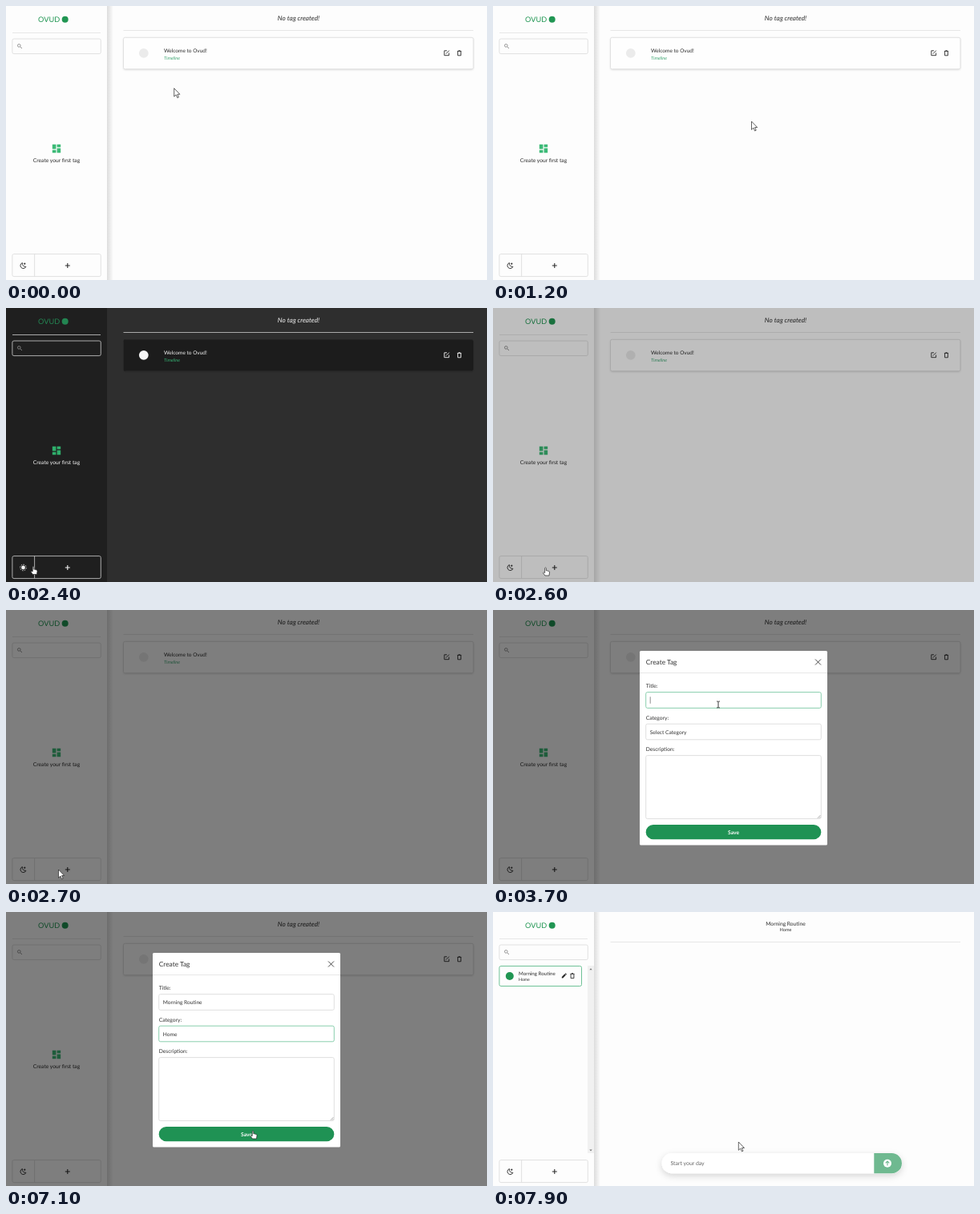
Write an HTML page that moves like this. It is 600x342 px and loops after 8000 ms.

```html
<!DOCTYPE html>
<html lang="en">
<head>
<meta charset="utf-8">
<title>Task list</title>
<style>
html, body { margin: 0; width: 100%; height: 100%; overflow: hidden; background: #fdfdfd; }
svg { display: block; width: 600px; height: 342px; font: 6.7px Lato, sans-serif; text-rendering: geometricPrecision;
  --side: #fdfdfd; --main: #fdfdfd; --card: #fefefe; --ink: #2b2b2b; --line: #e7e7e7; --edge: #dedede;
  --dot: #ebebeb; --brand: #219653; --accent: #3dba77; --sub: #3fa673; }
svg.dark { --side: #1f1f1f; --main: #2e2e2e; --card: #1f1f1f; --ink: #f5f5f5; --line: #a9a9a9; --edge: #bcbcbc;
  --dot: #f4f4f4; --brand: #238552; --accent: #2fae6b; --sub: #35b273; }
text { fill: var(--ink); }
.mid { text-anchor: middle; }
.ink { fill: var(--ink); }
.line { stroke: var(--line); }
.box { fill: none; stroke: var(--edge); stroke-width: .9; }
.pen { fill: none; stroke: var(--ink); stroke-width: .9; }
.field { fill: #fff; stroke: #dcdcdc; stroke-width: .9; }
.focus { stroke: #7cc9a4; }
.light { --ink: #333; --line: #e8e8e8; }
.pointer { fill: #fff; stroke: #222; stroke-width: .7; stroke-linejoin: round; }
.off { display: none; }
.dark .day, svg:not(.dark) .night { display: none; }
</style>
</head>
<body>
<svg id="stage" viewBox="0 0 600 342">
  <defs>
    <linearGradient id="fade"><stop stop-color="#000" stop-opacity=".13"/><stop offset="1" stop-color="#000" stop-opacity="0"/></linearGradient>
    <filter id="soft" x="-10%" y="-40%" width="120%" height="200%"><feDropShadow dx="0" dy="1" stdDeviation="1" flood-opacity=".14"/></filter>
    <filter id="float" x="-10%" y="-60%" width="120%" height="240%"><feDropShadow dx="0" dy="3" stdDeviation="4" flood-opacity=".16"/></filter>
    <path id="bin" class="pen" d="M-2.6-2.4H2.6M-1-3.1H1M-1.9-2.2V3H1.9V-2.2"/>
  </defs>

  <rect width="600" height="342" fill="var(--main)"/>
  <rect width="126" height="342" fill="var(--side)"/>
  <rect class="day" x="126" width="8" height="342" fill="url(#fade)"/>

  <!-- sidebar -->
  <text x="40" y="20" font-size="9.2" style="fill:var(--brand)">OVUD</text>
  <circle cx="73.7" cy="16.8" r="4" fill="var(--brand)"/>
  <path class="line" d="M8 33.5H118"/>
  <rect class="box" x="7.9" y="41" width="110.4" height="18.6" rx="2"/>
  <g fill="none" stroke="#888" stroke-width=".9"><circle cx="16.3" cy="49.4" r="1.8"/><path d="M17.7 50.8L20 53"/></g>

  <g id="noTags">
    <path fill="var(--accent)" transform="translate(56.1 171.1) scale(.575)" d="M3 13h8V3H3zM3 21h8v-6H3zM13 21h8V11h-8zM13 3v6h8V3z"/>
    <text class="mid" x="63" y="195.3">Create your first tag</text>
  </g>
  <g id="tags" class="off">
    <rect class="box" x="7.9" y="67.5" width="102.6" height="25" rx="2" style="stroke:#5fbb8c"/>
    <circle cx="20.8" cy="80" r="5" fill="var(--brand)"/>
    <text x="32" y="78.8" font-size="6.2">Morning Routine</text>
    <text x="32" y="85.6" font-size="5.2">Home</text>
    <path class="ink" d="M85.8 82.4v-1.5l3.6-3.6 1.5 1.5-3.6 3.6zM89.8 76.9l.7-.7 1.5 1.5-.7.7z"/>
    <use href="#bin" x="99" y="79.7"/>
    <rect x="118" y="67" width="8" height="234" fill="#f1f1f1"/>
    <path fill="#777" d="M120.3 72.3L122 70.3l1.7 2zM120.3 296.5h3.4L122 298.5z"/>
  </g>

  <rect id="hover" class="off" x="8" y="309.7" width="27.7" height="27.8" rx="2" fill="#e5e5e5"/>
  <rect class="box" x="7.9" y="309.6" width="110.4" height="28" rx="2"/>
  <path class="box" d="M35.6 309.6v28"/>
  <g class="day">
    <path class="pen" d="M20.4 320.6A3.6 3.6 0 1 0 24.9 325.4A4 4 0 0 1 20.4 320.6z"/>
    <path class="ink" d="M23.2 320l.5 1.3 1.3.5-1.3.5-.5 1.3-.5-1.3-1.3-.5 1.3-.5z"/>
  </g>
  <g class="night">
    <circle class="ink" cx="21.5" cy="324" r="2.4"/>
    <circle class="pen" cx="21.5" cy="324" r="3.8" pathLength="16" stroke-dasharray="1"/>
  </g>
  <path class="pen" d="M73.8 324h6M76.8 321v6" style="stroke-width:1.1"/>

  <!-- welcome page -->
  <g id="welcome">
    <text class="mid" x="365" y="17.8" font-size="8.2" font-style="italic">No tag created!</text>
    <path class="line" d="M146.500 30.5H583"/>
    <rect x="146.500" y="39.300" width="436.500" height="39.400" rx="2" fill="var(--card)" filter="url(#soft)"/>
    <rect class="box day" x="146.500" y="39.300" width="436.500" height="39.400" rx="2"/>
    <circle cx="171.800" cy="58.800" r="5.900" fill="var(--dot)"/>
    <text x="197" y="58" font-size="6.5">Welcome to Ovud!</text>
    <text x="197" y="66.700" font-size="5.700" font-style="italic" style="fill:var(--sub)">Timeline</text>
    <path class="pen" d="M550 55.800H546.800V61.700H552.600V58.600M548.900 59.600L552.800 55.600"/>
    <use href="#bin" x="565.500" y="58.800"/>
  </g>

  <!-- tag page -->
  <g id="page" class="off">
    <text class="mid" x="365" y="17.200">Morning Routine</text>
    <text class="mid" x="365" y="24.300" font-size="5.600">Home</text>
    <path class="line" d="M146.500 37.500H583"/>
    <rect x="210.500" y="301" width="299.500" height="25.300" rx="12.650" fill="#fff" filter="url(#float)"/>
    <path fill="#6fb990" d="M475.300 301H497.350a12.650 12.650 0 0 1 0 25.300H475.300z"/>
    <circle cx="492" cy="313.700" r="5" fill="#fff"/>
    <path fill="none" stroke="#6fb990" stroke-width="1.100" d="M492 316.500v-5M489.700 313.300L492 311l2.300 2.300"/>
    <text x="221.500" y="316.200" font-size="6.900" style="fill:#666">Start your day</text>
  </g>

  <rect id="shade" width="600" height="342" opacity="0"/>

  <g id="modal" class="light off">
    <rect x="183" y="51" width="234" height="242.500" rx="1.500" fill="#fff"/>
    <text x="190.700" y="67.800" font-size="8.400">Create Tag</text>
    <path class="pen" d="M402 61.500l7 7M409 61.500l-7 7"/>
    <path class="line" d="M183 78.500H417"/>
    <text x="190.700" y="97.200">Title:</text>
    <rect id="titleBox" class="field" x="190.700" y="102.600" width="218.600" height="19.800" rx="2"/>
    <text id="titleText" x="195.800" y="115" font-size="6.600"></text>
    <path id="caret" d="M0 108.300v8.500" stroke="#444" stroke-width=".6"/>
    <text x="190.700" y="136.600">Category:</text>
    <rect id="pickBox" class="field" x="190.700" y="142.200" width="218.600" height="19.600" rx="2"/>
    <text id="pickText" x="195.800" y="154.600" font-size="6.600"></text>
    <text x="190.700" y="176.200">Description:</text>
    <rect class="field" x="190.700" y="181.600" width="218.600" height="79" rx="2"/>
    <path d="M404.800 259.800l3.700-3.700M406.800 259.800l1.700-1.700" stroke="#777" stroke-width=".6"/>
    <rect x="190.700" y="268" width="218.600" height="18.300" rx="9.150" fill="#1f9254"/>
    <text class="mid" x="300" y="279.600" font-weight="700" style="fill:#fff">Save</text>
    <g id="list">
      <rect x="190.700" y="162" width="218.600" height="43.600" fill="#fff" stroke="#888" stroke-width=".6"/>
      <rect id="mark" x="191" width="218" height="10.800" fill="#1e73d8"/>
    </g>
  </g>

  <g id="cursor">
    <path id="arrow" class="pointer" d="M0 0V10.300L2.400 8.100 4.100 11.900 5.700 11.200 4.100 7.500H7.200z"/>
    <path id="hand" class="pointer" d="M-.8 6.500V.6Q0-.6.8.6V3.800Q1.800 3.200 2.400 4.200 3.500 3.700 4 4.800 5 4.500 5.100 5.600L4.500 10H-.6L-3 6.700Q-2.500 5.400-.8 6.500z"/>
    <path id="beam" fill="none" stroke="#222" stroke-width=".9" d="M-1.900-4Q-.3-4 0-3.300.3-4 1.900-4M0-3.300V3.300M-1.900 4Q-.3 4 0 3.300.3 4 1.900 4"/>
  </g>
</svg>
<script>
const $ = id => document.getElementById(id);
const LOOP = 8000, STEP = 100;
const title = 'Morning Routine';
const keys = [3800, 3900, 4000, 4100, 4200, 4300, 5000, 5200, 5500, 5600, 5700, 5700, 5800, 5800, 5900];
const options = ['Select Category', 'Home', 'Work', 'Other'];

// time, x, y and pointer shape from that time on
const path = [
  [0, 209.7, 102.7, 'arrow'], [100, 209.7, 102.7, 'arrow'], [400, 236, 108, 'arrow'], [500, 236, 108, 'arrow'],
  [1000, 430, 120, 'arrow'], [1400, 215, 168, 'arrow'], [1900, 34, 322, 'hand'], [2100, 35, 322.5, 'hand'],
  [2400, 34, 322.5, 'hand'], [2600, 65.5, 324, 'hand'], [2700, 65.5, 324, 'arrow'], [2800, 65.5, 324, 'arrow'],
  [3200, 240, 175, 'arrow'], [3500, 281, 118, 'beam'], [6000, 281, 118, 'beam'], [6200, 279, 148, 'arrow'],
  [6400, 278, 151, 'arrow'], [6700, 262, 177, 'arrow'], [6900, 262, 178, 'arrow'], [7100, 308, 273, 'hand'],
  [7300, 309, 273, 'arrow'], [7500, 310, 262, 'arrow'], [7600, 310, 262, 'arrow'], [7900, 306.3, 287, 'arrow'],
  [LOOP, 306.3, 287, 'arrow']
];

const optionY = i => 162.2 + i * 10.8;
options.forEach((name, i) => {
  const item = document.createElementNS('http://www.w3.org/2000/svg', 'text');
  item.setAttribute('x', 195.8);
  item.setAttribute('y', optionY(i) + 7.7);
  item.textContent = name;
  $('list').append(item);
});

const ramp = (t, from, to) => Math.min(1, Math.max(0, (t - from) / (to - from)));
const ease = k => 1 - (1 - k) ** 2;
const within = (t, from, to) => t >= from && t < to;
const show = (id, on) => $(id).classList.toggle('off', !on);
const set = (id, name, value) => $(id).setAttribute(name, value);

function drawCursor(t) {
  const i = path.findIndex((p, n) => t >= p[0] && t < path[n + 1][0]);
  const [t0, x0, y0, shape] = path[i], [t1, x1, y1] = path[i + 1];
  const k = ramp(t, t0, t1);
  set('cursor', 'transform', `translate(${x0 + (x1 - x0) * k} ${y0 + (y1 - y0) * k})`);
  for (const id of ['arrow', 'hand', 'beam']) show(id, id === shape);
}

function drawForm(t) {
  const typed = keys.filter(k => k <= t);
  $('titleText').textContent = title.slice(0, typed.length);
  const sinceKey = t - (typed.at(-1) ?? 3600);
  show('caret', within(t, 3600, 6000) && sinceKey % 1000 < 500);
  const gap = title[typed.length - 1] === ' ' ? 1.3 : 0;
  const width = typed.length ? $('titleText').getComputedTextLength() + gap : 0;
  set('caret', 'transform', `translate(${196.2 + width} 0)`);

  $('titleBox').classList.toggle('focus', within(t, 3600, 6400));
  $('pickBox').classList.toggle('focus', t >= 6400);
  $('pickText').textContent = options[t < 6800 ? 0 : 1];
  const active = t < 6600 ? 0 : 1;
  show('list', within(t, 6400, 6800));
  set('mark', 'y', optionY(active));
  $('list').querySelectorAll('text').forEach((item, i) => item.style.fill = i === active ? '#fff' : '#222');
}

function draw(t) {
  const saved = t >= 7200;
  $('stage').classList.toggle('dark', within(t, 2200, 2500));
  show('hover', within(t, 1900, 2200));
  for (const id of ['noTags', 'welcome']) show(id, !saved);
  for (const id of ['tags', 'page']) show(id, saved);
  set('shade', 'opacity', .5 * (ramp(t, 2500, 2700) - ramp(t, 7300, 7500)));

  const open = ease(ramp(t, 2700, 3000)) - ramp(t, 7100, 7400);
  show('modal', open > 0);
  set('modal', 'opacity', open);
  set('modal', 'transform', `translate(0 ${-21 * (1 - open)})`);
  if (open > 0) drawForm(t);
  drawCursor(t);
}

function tick() {
  draw(Math.floor(performance.now() % LOOP / STEP) * STEP);
  requestAnimationFrame(tick);
}
tick();
</script>
</body>
</html>
```
